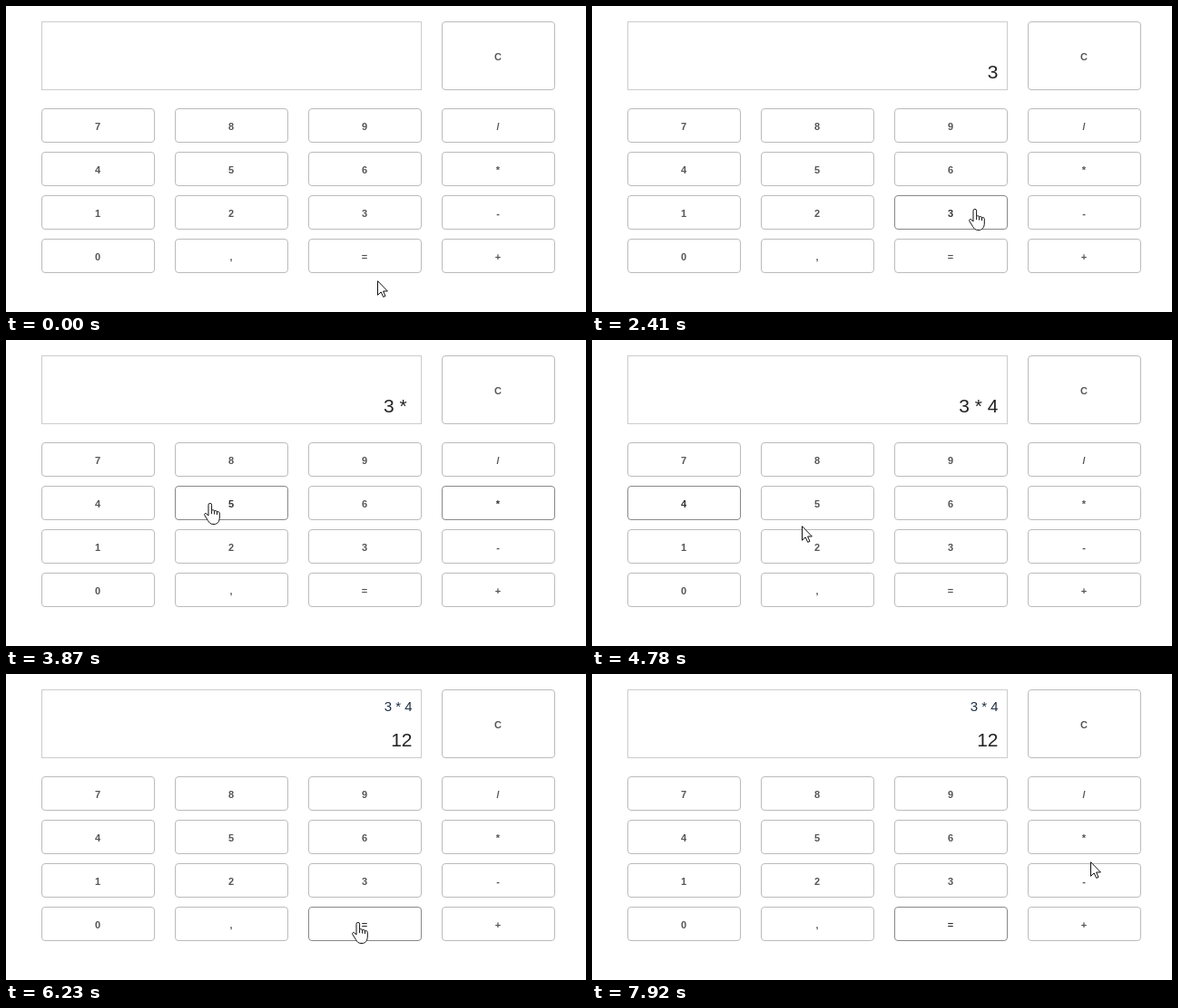
These frames come from a looping animation (639 by 338 pixels, 7990 ms). An HTML page:

```html
<!DOCTYPE html>
<html lang="en">
<head>
<meta charset="utf-8">
<title>Calculator</title>
<style>
html, body { margin: 0; width: 100%; height: 100%; overflow: hidden; background: #fff; }
svg { display: block; }
text { font-family: "Liberation Sans", Arial, sans-serif; fill: #222; text-anchor: end; }
.key rect { fill: #fff; stroke: #bbb; }
.key text { font-size: 11px; font-weight: 600; fill: #555; text-anchor: middle; }
.key.on rect { stroke: #888; }
.key.on text { fill: #333; }
#arrow, #hand { fill: #fff; stroke: #111; }
</style>
</head>
<body>
<svg width="639" height="338" viewBox="0 0 639 338">
  <rect x="39.5" y="17.5" width="418" height="75" fill="#fff" stroke="#ccc"/>
  <text id="past" x="447.5" y="41" font-size="15" style="fill:#1f2f45"></text>
  <text id="value" x="447.5" y="80" font-size="21"></text>
  <g id="keys"></g>
  <path id="arrow" d="M.5.7V16.3L4.2 12.9 6.7 18.4 9 17.4 6.6 12H11.4Z"/>
  <path id="hand" stroke-linejoin="round" d="M5 14V2.2a1.8 1.8 0 0 1 3.6 0V8.5c.5-1.2 2.9-1 3 .6c.5-1 2.8-.8 2.9.9c.6-.8 2.6-.6 2.8 1.2V16c0 4.5-2.3 7.5-6.3 7.5S6 22 4.5 19.5L.8 13.6c-.8-1.8 1.2-2.8 2.4-1.5ZM8.6 8.5v3.6m3-3v3.4m2.9-2.5v3"/>
</svg>
<script>
const LOOP = 7990;
const $ = id => document.getElementById(id);
const keys = [];

function addKey(label, x, y, h = 38) {
  $('keys').insertAdjacentHTML('beforeend',
    `<g class="key"><rect x="${x + .5}" y="${y + .5}" width="124" height="${h - 1}" rx="3.5"/>
     <text x="${x + 62}" y="${y + h / 2 + 5}">${label}</text></g>`);
  keys.push({ label, x, y, h, el: $('keys').lastElementChild });
}
addKey('C', 480, 17, 76);
[...'789/456*123-0,=+'].forEach((c, i) => addKey(c, 39 + i % 4 * 147, 113 + (i >> 2) * 48));

const ease = {
  both: p => p * p * (3 - 2 * p),
  in: p => p ** 1.4,
  out: p => 1 - (1 - p) ** 1.8,
  none: p => p
};
// first step, last step, number of steps, target x, y, easing
const moves = [
  [150, 920, 12, 400, 240, 'both'],
  [990, 1260, 4, 400, 232, 'out'],
  [2200, 2980, 12, 540, 181, 'both'],
  [3310, 4090, 12, 115, 179, 'both'],
  [4160, 4370, 4, 121, 179, 'out'],
  [4640, 4780, 3, 231, 205, 'in'],
  [4850, 5370, 8, 388, 275, 'out'],
  [5440, 5700, 3, 386, 276, 'out'],
  [6230, 7010, 12, 470, 195, 'both'],
  [7080, 7220, 3, 487, 187, 'none'],
  [7290, 7850, 9, 543, 202, 'none'],
  [7920, 7920, 1, 549, 207, 'none']
];
const clicks = [[0, ''], [1870, '3'], [2980, '*'], [4160, '4'], [5440, '=']];
const display = [[0, ''], [2000, '3'], [3110, '3 *\u00a0'], [4290, '3 * 4'], [5570, '12', '3 * 4']];
const latest = (list, t) => list.findLast(e => e[0] <= t);

function pointer(t) {
  let x = 409, y = 303;
  for (const [a, b, n, tx, ty, kind] of moves) {
    if (t < a) break;
    const step = n > 1 ? Math.floor((t - a) / (b - a) * (n - 1) + .001) : 0;
    const p = ease[kind](Math.min(1, (step + 1) / n));
    x += (tx - x) * p;
    y += (ty - y) * p;
  }
  return [Math.round(x), Math.round(y)];
}

function draw(now) {
  const t = now % LOOP;
  const [x, y] = pointer(t);
  const focus = latest(clicks, t)[1];
  let over = false;
  for (const k of keys) {
    const hit = x >= k.x && x < k.x + 125 && y >= k.y && y < k.y + k.h;
    over ||= hit;
    k.el.classList.toggle('on', hit || k.label === focus);
  }
  const [, value, past = ''] = latest(display, t);
  $('value').textContent = value;
  $('past').textContent = past;
  $('arrow').style.display = over ? 'none' : '';
  $('hand').style.display = over ? '' : 'none';
  $('arrow').setAttribute('transform', `translate(${x} ${y})`);
  $('hand').setAttribute('transform', `translate(${x - 7} ${y})`);
}

const start = performance.now();
function tick() {
  draw(performance.now() - start);
  requestAnimationFrame(tick);
}
tick();
</script>
</body>
</html>
```
